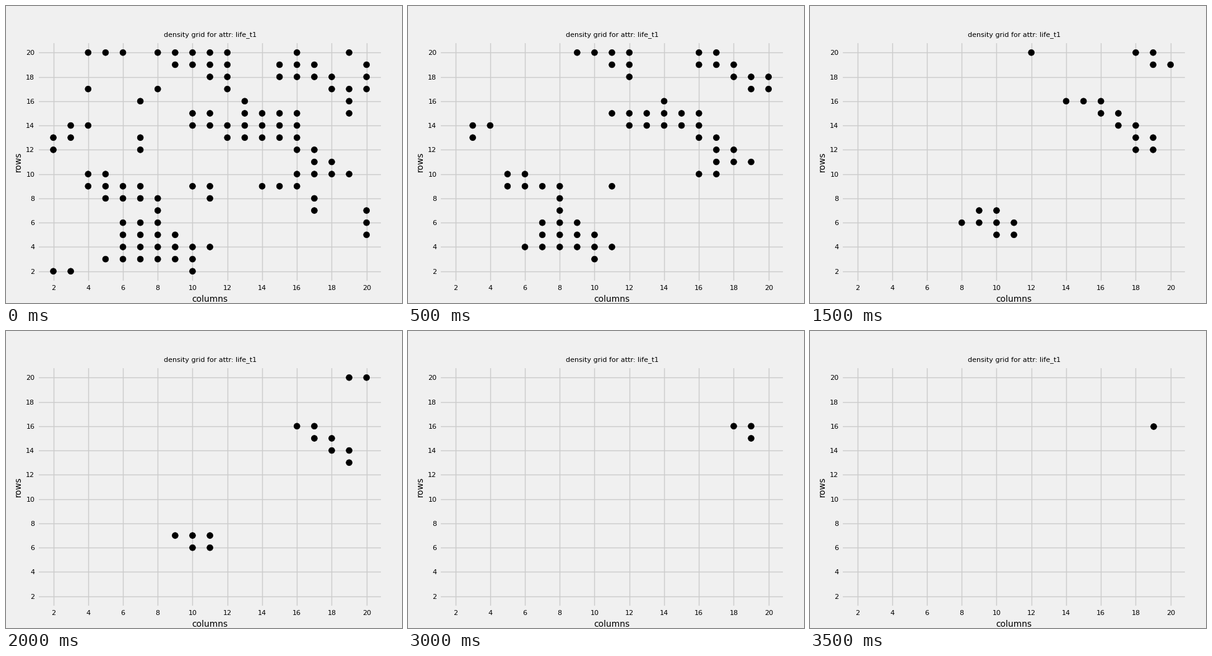
A matplotlib script that plays this animation: 640 by 480 pixels, repeating every 4 s.

```python
import numpy as np
import matplotlib.pyplot as plt
from matplotlib.animation import FuncAnimation

STEPS = 8
SIZE = 21
PAPER = "#f0f0f0"
DOT_AREA = 50

# Live cells at the start: row -> columns, runs given as (first, last)
START = {
    20: [(4, 6), (8, 12), 16, 19],
    19: [(9, 12), (15, 17), 20],
    18: [(11, 12), (15, 18), 20],
    17: [4, 8, 12, (18, 20)],
    16: [7, 13, 19],
    15: [(10, 11), (13, 16), 19],
    14: [(3, 4), (10, 16)],
    13: [(2, 3), 7, (12, 16)],
    12: [2, 7, (16, 17)],
    11: [(17, 18)],
    10: [(4, 5), (16, 19)],
    9: [(4, 7), (10, 11), (14, 16)],
    8: [(5, 8), 11, 17],
    7: [8, 17, 20],
    6: [(6, 8), 20],
    5: [(6, 9), 20],
    4: [(6, 11)],
    3: [(5, 10)],
    2: [(2, 3), 10],
}


def start_grid():
    grid = np.zeros((SIZE, SIZE), dtype=int)
    for row, runs in START.items():
        for run in runs:
            first, last = run if isinstance(run, tuple) else (run, run)
            grid[row, first:last + 1] = 1
    return grid


def advance(grid):
    """A cell lives if at least 3 of itself, west, south and south-west live."""
    new = np.zeros_like(grid)
    block = grid[1:, 1:] + grid[1:, :-1] + grid[:-1, 1:] + grid[:-1, :-1]
    new[1:, 1:] = block >= 3
    return new


def history():
    grid = start_grid()
    points = []
    for _ in range(STEPS):
        rows, cols = np.nonzero(grid)
        points.append(np.column_stack([cols, rows]))
        grid = advance(grid)
    return points


plt.rcParams.update({
    "font.family": "DejaVu Sans",
    "axes.linewidth": 3,
    "axes.edgecolor": PAPER,
    "axes.facecolor": PAPER,
    "figure.facecolor": PAPER,
    "savefig.facecolor": PAPER,
    "patch.linewidth": 0.5,
})

fig, ax = plt.subplots(figsize=(6.4, 4.8), dpi=100)
fig.subplots_adjust(left=0.08, right=0.95, bottom=0.07, top=0.88)
ticks = range(2, 21, 2)
ax.set(xlim=(1.1, 20.9), ylim=(1.1, 20.9), xticks=ticks, yticks=ticks)
ax.set_axisbelow(True)
ax.grid(color="#cbcbcb", linewidth=1, linestyle="-")
ax.tick_params(length=0, labelsize=8, pad=3.5)
ax.set_title("density grid for attr: life_t1", fontsize=8)
ax.set_xlabel("columns", fontsize=10)
ax.set_ylabel("rows", fontsize=10)

POINTS = history()
dots = ax.scatter(*POINTS[0].T, s=DOT_AREA, color="black", linewidths=0.5)


def draw(step):
    cells = POINTS[step % STEPS]
    dots.set_offsets(cells)
    dots.set_sizes(np.full(len(cells), DOT_AREA))
    return (dots,)


anim = FuncAnimation(fig, draw, frames=STEPS, interval=500,
                     repeat=True, repeat_delay=0, blit=False)
plt.show()
```
